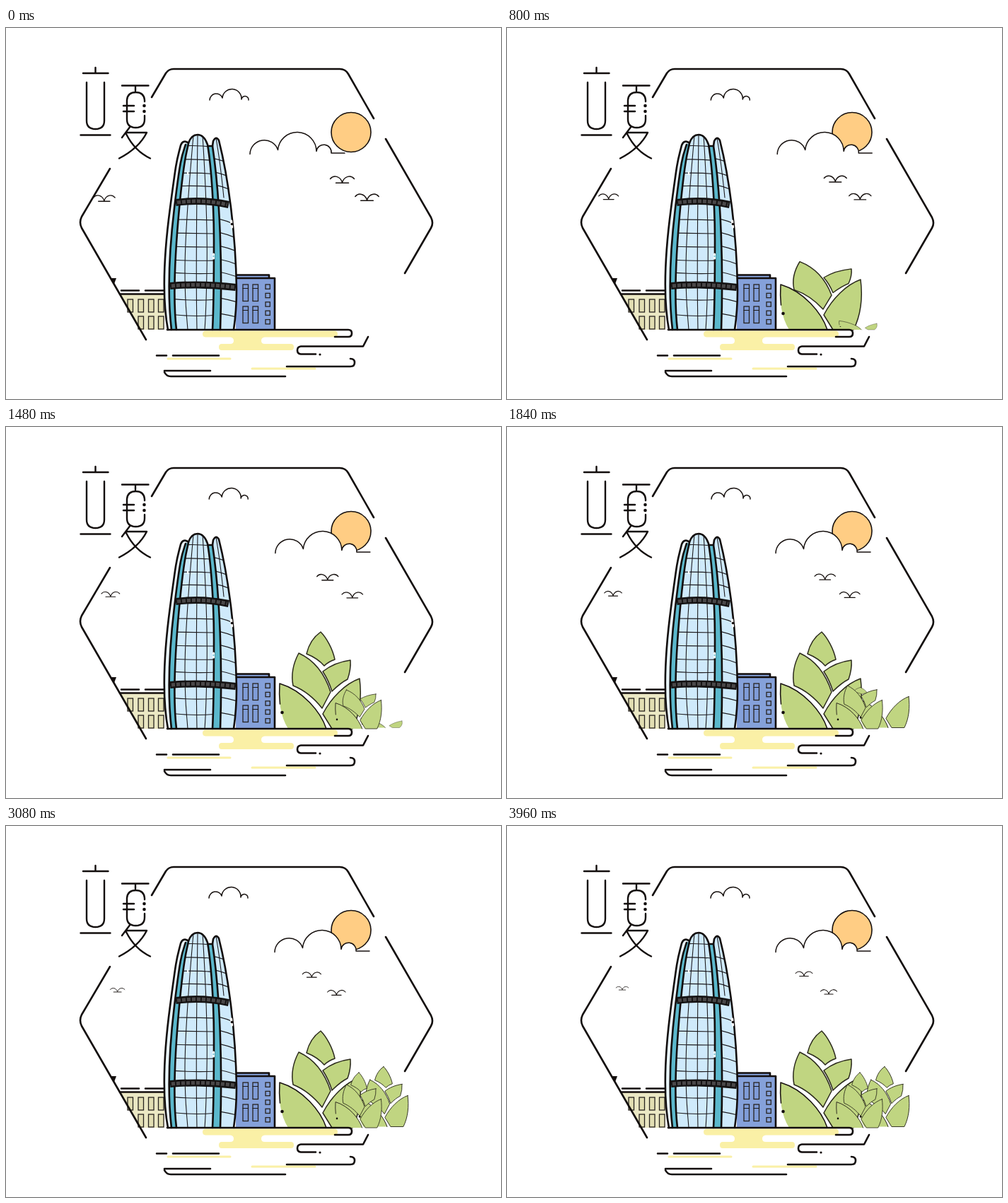
Animation of 700 by 525 pixels, one loop 4000 ms. Source, as an HTML page:

```html
<!DOCTYPE html>
<html lang="zh">
<head>
<meta charset="utf-8">
<title>立夏</title>
<style>
html, body { margin: 0; width: 100%; height: 100%; overflow: hidden; background: #fff; }
svg { display: block; width: 100vw; height: 100vh; }
path, circle { stroke-linecap: round; stroke-linejoin: round; }
.line { fill: none; stroke: #120d0c; stroke-width: 2.6; }
.thin { fill: none; stroke: #17110f; stroke-width: 1.5; }
.grid { fill: none; stroke: #1c1a1c; stroke-width: 1.1; }
.ink { fill: #120d0c; }
.glass { fill: #cfeafb; }
.teal { fill: #5bb8cc; }
.glow { fill: #faf0a6; }
.leaf { fill: #c0d581; stroke: #2b2a1c; stroke-width: 1.5; }
.edge { stroke: none; }
</style>
</head>
<body>
<svg viewBox="0 0 700 525" xmlns="http://www.w3.org/2000/svg">
  <defs>
    <path id="bird" class="thin" d="M-17 0C-12 -6 -3 -4 0 5C3 -4 12 -6 17 0M-9 5.8H9"/>
    <clipPath id="core"><path d="M241 427C236 385 238 330 245 255S255 180 258 163Q262 151 271 151T285 165C291 200 294 260 294 300S294 390 292 427Z"/></clipPath>
    <clipPath id="side"><path d="M293 160Q297 152 301 159C314 210 325 290 326 370Q326 400 322 427H303C306 340 303 240 292 167Z"/></clipPath>
  </defs>

  <circle cx="488" cy="147.5" r="28" fill="#ffcd84" stroke="#17110f" stroke-width="1.6"/>
  <g id="bigCloud">
    <path fill="#fff" d="M380 178.500A20.3 20.3 0 0 1 419.5 172.500A27.3 27.3 0 0 1 474 174.500A10.5 10.5 0 0 1 495 177V178.500Z"/>
    <path class="thin" d="M380 178.500A20.3 20.3 0 0 1 419.5 172.500A27.3 27.3 0 0 1 474 174.500A10.5 10.5 0 0 1 495 177H514"/>
  </g>
  <path id="smallCloud" class="thin" d="M288 102A9.3 9.3 0 0 1 306 99A13.5 13.5 0 0 1 333 101A5 5 0 0 1 343 102"/>
  <g id="birds"></g>

  <!-- low building on the left -->
  <path fill="#ebe8c4" d="M162 377H224V427H190Z"/>
  <g id="leftWindows"></g>
  <path class="line" d="M163 371.5H188M197 371.5H224M161 376.5H224"/>
  <path class="ink" d="M147 354H156L153 362Z"/>

  <!-- blue building -->
  <path fill="#85a1da" d="M325 349H372V354H379V426H325Z"/>
  <path class="line" d="M325 349.5H372V354M325 354H380V426"/>
  <g id="blueWindows"></g>

  <!-- tower -->
  <path fill="#eaf6fc" d="M229 427C221 385 222 330 232 255S241 190 247 166Q250 158 257 163L241 427Z"/>
  <path class="teal" d="M234 427C229 385 229 330 238 255S249 180 254 165L258 163C252 200 249 225 245 255C238 330 236 385 241 427Z"/>
  <path class="teal" d="M285 167H292C303 240 306 340 303 427H292C294 390 294 340 294 300S291 200 285 167Z"/>
  <path class="glass" d="M241 427C236 385 238 330 245 255S255 180 258 163Q262 151 271 151T285 165C291 200 294 260 294 300S294 390 292 427Z"/>
  <path class="glass" d="M293 160Q297 152 301 159C314 210 325 290 326 370Q326 400 322 427H303C306 340 303 240 292 167Z"/>
  <g id="coreGrid" class="grid" clip-path="url(#core)"></g>
  <g id="sideGrid" class="grid" clip-path="url(#side)"></g>
  <path class="line" d="M229 427C221 385 222 330 232 255S241 190 247 166Q250 158 257 162M234 427C229 385 229 330 238 255S249 180 254 165"/>
  <path class="line" d="M241 427C236 385 238 330 245 255S255 180 258 163Q262 151 271 151T285 165C291 200 294 260 294 300S294 390 292 427M286 167H292"/>
  <path class="line" d="M303 427C306 340 303 240 292 167L293 160Q297 152 301 159C314 210 325 290 326 370Q326 400 322 427"/>
  <path d="M240 247Q278 242 315 250M232 365Q278 361 325 367" fill="none" stroke="#151313" stroke-width="10" style="stroke-linecap:butt"/>
  <path d="M242 247Q278 242 313 250M234 365Q278 361 323 367" fill="none" stroke="#4a4849" stroke-width="5" stroke-dasharray="5 2" style="stroke-linecap:butt"/>
  <path d="M318.500 273L319.500 282M293.5 320V326" stroke="#fff" stroke-width="3.2"/>
  <path d="M257 204V207" stroke="#fff" stroke-width="2"/>
  <circle class="ink" cx="319.5" cy="277.5" r="1.8"/>
  <circle class="teal" cx="293.5" cy="323" r="1.1"/>

  <g id="plants"></g>

  <!-- water -->
  <path class="glow" d="M282 428.500H464Q469 428.500 469 433T464 437.500H366Q361 438 361 442.500T366 447H403Q407 447 407 451.500T403 456H305Q301 456 301 451.500T305 447H317Q322 447 322 442.500T317 437.500H282Q278 437 278 433T282 428.500Z"/>
  <path d="M229 468H317M348 482H437" stroke="#faf0a6" stroke-width="3"/>
  <path class="line" d="M228 427H484Q489 427 489 432T484 437H465M512 437L505 450.500H417Q412 451 412 456T417 461.500H438M487 468Q493 468 493 473.500T487 479H397M213 463.500H227M236 463.500H301M224 485H289M224 487Q227 493 233 493H395"/>
  <circle class="ink" cx="444" cy="462" r="1.6"/>

  <!-- frame -->
  <path class="line" d="M206 98L226 64Q230 58 237 58H472Q480 58 484 65L520 128M537 157L601 268Q605 276 601 283L564 347M147 199L107 267Q103 275 107 283L198 441"/>

  <!-- lettering -->
  <g class="line" style="stroke-width:2.4">
    <path d="M126.500 56V64M109 64H144.500M114 77V131Q114 143 126.500 143T139 131V77M105.500 151.500H147.500"/>
    <path d="M164 81.500H201.500M183 82V90M196 104V102Q195 91 183.500 91T171 102V129Q171 141 183.500 141T196 129V124M166 110H181M166 118H181M176 139L164 155M170 148H199Q188 170 160 184.500M170 150Q182 174 204 184.500"/>
  </g>
  <circle class="ink" cx="195.500" cy="110" r="2.3"/>
  <circle class="ink" cx="195.500" cy="118" r="2.3"/>
</svg>
<script>
const LOOP = 4000, STEP = 40;
const $ = id => document.getElementById(id);
const clamp = v => Math.max(0, Math.min(1, v));
const mix = (a, b, k) => a + (b - a) * k;
const smooth = k => k * k * (3 - 2 * k);
const path = (d, cls = '') => `<path class="${cls}" d="${d}"/>`;
const box = (x, y, w, h, fill) =>
  `<rect x="${x}" y="${y}" width="${w}" height="${h}" fill="${fill}" stroke="#27231f" stroke-width="1.3"/>`;

function buildWindows() {
  let left = '', blue = '';
  for (const x of [172, 187, 201.5, 215.5]) {
    left += box(x, 384, 7.5, 18, '#e2deb2');
    if (x > 180) left += box(x, 408, 7.5, 18, '#e2deb2');
  }
  for (const x of [335, 349]) {
    for (const y of [363, 394]) {
      blue += box(x, y, 7.5, 23.5, '#7f9cd8') + path(`M${x} ${y + 5.5}h7.5`, 'grid');
    }
  }
  for (let i = 0; i < 5; i++) blue += box(367, 363 + i * 12.4, 6.3, 6.3, '#85a1da');
  $('leftWindows').innerHTML = left;
  $('blueWindows').innerHTML = blue;
}

function buildGrids() {
  let core = path('M265 152C258 230 253 300 253 345S255 400 257 427M271 152C270 240 268 330 270 427M278 152C283 230 285 300 284 345S283 400 281 427');
  let side = path('M297 156Q303 190 308 240');
  for (const y of [168, 187, 206, 224, 271, 290, 309, 328, 346, 383, 405]) {
    const bend = (y - 270) / 30;
    core += path(`M232 ${y}Q268 ${y + bend} 298 ${y + 1}`);
    if (y > 170) side += path(`M290 ${y - 3}Q310 ${y} 328 ${y + 9 - bend}`);
  }
  $('coreGrid').innerHTML = core;
  $('sideGrid').innerHTML = side;
}

// Leaf: outline, pivot, start and length of growth
const LEAVES = [
  { d: 'M445 290C435 297 428 308 425 321C435 325 444 331 450 338Q456 332 465 329C462 314 453 298 445 290Z', at: [452, 343], from: 1020, len: 460 },
  { d: 'M414 320C406 335 403 351 406 366C421 372 436 384 447 398L459 375C451 350 436 330 414 320Z', at: [449, 398], from: 480, len: 460 },
  { d: 'M487 330C472 332 458 338 448 346Q456 358 461 374C468 367 475 361 483 357Q488 343 487 330Z', at: [461, 377], from: 520, len: 460 },
  { d: 'M387 363C385 385 388 410 399 427H453C445 403 420 373 387 363Z', at: [428, 427], from: 0, len: 400,
    line: 'M387.5 392Q386 378 387 363C420 373 445 403 453 427', dot: [390.5, 404] },
  { d: 'M500 356C480 363 460 383 448 406L461 427H490C501 405 503 380 500 356Z', at: [470, 427], from: 40, len: 400 }
];
const PLANTS = [
  { x: 387, y: 427, size: 1, delay: 0 },
  { x: 498, y: 425.5, size: 0.62, delay: 1360 },
  { x: 466, y: 427, size: 0.57, delay: 680 }
];

function buildPlants() {
  const leaf = l => l.line
    ? path(l.d, 'leaf edge') + path(l.line, 'thin') + `<circle class="ink" cx="${l.dot[0]}" cy="${l.dot[1]}" r="2.3"/>`
    : path(l.d, 'leaf');
  $('plants').innerHTML = PLANTS.map(p =>
    `<g transform="translate(${p.x} ${p.y}) scale(${p.size}) translate(-387 -427)">` +
    LEAVES.map(l => `<g class="sprout">${leaf(l)}</g>`).join('') + '</g>').join('');
}

// Bird: start x, y, size, then end x, y, size
const BIRDS = [
  [475.5, 213.5, 1, 420, 208.5, 0.7],
  [510.5, 238.5, 0.98, 455, 234, 0.68],
  [138.8, 240, 0.9, 163, 229, 0.52]
];
const SWAY = [[0, 0], [500, 2.2], [1160, -2.2], [1850, 1], [2360, 0], [3050, -1], [3960, 0], [4000, 0]];

function sway(t) {
  const i = Math.max(1, SWAY.findIndex(k => k[0] >= t));
  const [a, b] = [SWAY[i - 1], SWAY[i]];
  return mix(a[1], b[1], smooth((t - a[0]) / (b[0] - a[0])));
}

// Width opens first, height follows with a slight overshoot
function grow(k) {
  const back = 1 + 2.1 * (k - 1) ** 3 + 1.1 * (k - 1) ** 2;
  return [clamp(k * 2.8), mix(k, back, k * k)];
}

buildWindows();
buildGrids();
buildPlants();
$('birds').innerHTML = BIRDS.map(() => '<use href="#bird"/>').join('');
const birds = [...$('birds').children];
const sprouts = [...document.querySelectorAll('.sprout')];

function draw(t) {
  const drift = -35 * Math.exp(-t / 420) * Math.cos(t / 2500 * 2 * Math.PI);
  $('bigCloud').setAttribute('transform', `translate(${drift} 0)`);
  $('smallCloud').setAttribute('transform', `translate(${sway(t)} 0)`);
  birds.forEach((el, i) => {
    const b = BIRDS[i], k = t / 3960;
    const [x, y, s] = [0, 1, 2].map(j => mix(b[j], b[j + 3], k));
    el.setAttribute('transform', `translate(${x} ${y}) scale(${s})`);
  });
  sprouts.forEach((el, i) => {
    const p = PLANTS[Math.floor(i / LEAVES.length)], l = LEAVES[i % LEAVES.length];
    const k = clamp((t - p.delay - l.from) / l.len);
    const [sx, sy] = grow(k), [x, y] = l.at;
    el.style.display = k > 0 ? '' : 'none';
    el.setAttribute('transform', `translate(${x} ${y}) scale(${sx} ${sy}) translate(${-x} ${-y})`);
  });
}

const start = performance.now();
function tick() {
  const t = (performance.now() - start) % LOOP;
  draw(Math.floor(t / STEP) * STEP);
  requestAnimationFrame(tick);
}
tick();
</script>
</body>
</html>
```
